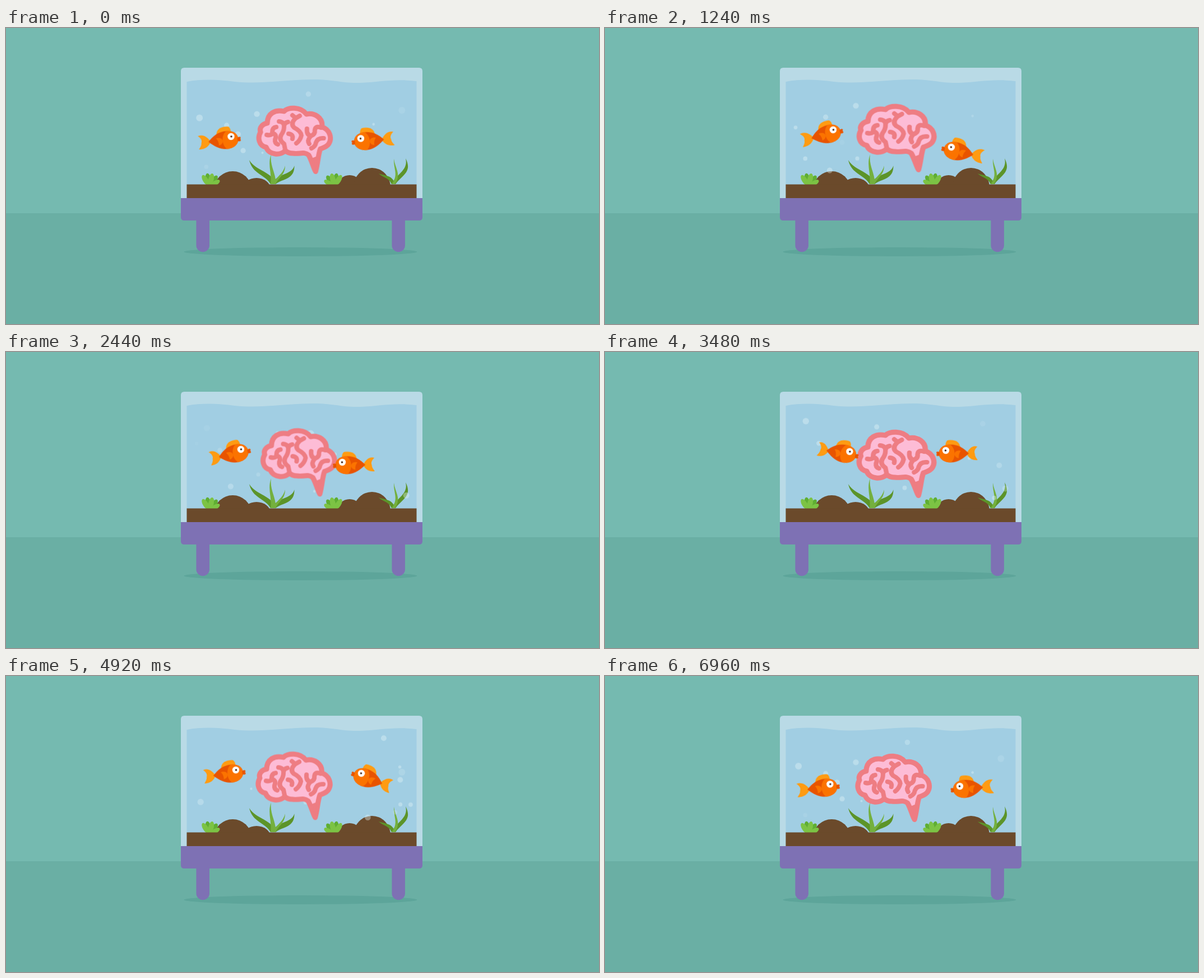
An HTML page that plays this animation: 1058x529 px, repeating every 7 s.

```html
<!DOCTYPE html>
<html lang="en">
<head>
<meta charset="utf-8">
<title>Brain in a fish tank</title>
<style>
  html, body { margin: 0; width: 100%; height: 100%; overflow: hidden; background: #75bab0; }
  svg { display: block; width: 100%; height: 100%; }

  #leftFish { animation: swimLeft 7s linear infinite; }
  #rightFish { animation: swimRight 7s linear infinite; }
  @keyframes swimLeft {
    0%, 100% { transform: translate(401.5px, 194px) rotate(-5deg); }
    17.7% { transform: translate(407px, 182px) rotate(-13deg); }
    34.9% { transform: translate(419px, 174px) rotate(-11deg); }
    49.7% { transform: translate(436.5px, 178px) rotate(11deg); }
    70.3% { transform: translate(410px, 168px) rotate(-6deg); }
    82.3% { transform: translate(399px, 174px) rotate(-8deg); }
  }
  @keyframes swimRight {
    0%, 100% { transform: translate(633px, 197.5px) rotate(-6deg); }
    17.7% { transform: translate(618px, 213px) rotate(11deg); }
    34.9% { transform: translate(600px, 197px) rotate(-2deg); }
    49.7% { transform: translate(608px, 176px) rotate(-1deg); }
    70.3% { transform: translate(634px, 174px) rotate(18deg); }
    82.3% { transform: translate(634.5px, 183px) rotate(8deg); }
  }

  /* Sine-like swings whose periods divide the loop */
  .sway, .bob, .stretch, .tail {
    animation: sway 3.5s cubic-bezier(.37, 0, .63, 1) -1.167s infinite alternate;
  }
  .bob { animation-name: bob; animation-duration: 1.75s; animation-delay: 0s; }
  .stretch { animation-name: stretch; animation-duration: 1.16667s; animation-delay: 0s; transform-origin: 515px 0; }
  .tail { animation-name: wag; animation-duration: .25s; animation-delay: -.125s; transform-origin: -38px 6px; }
  @keyframes sway { from { transform: translateX(-2.5px); } to { transform: translateX(7.5px); } }
  @keyframes bob { from { transform: translateY(0); } to { transform: translateY(-4px); } }
  @keyframes stretch { from { transform: scaleX(.997); } to { transform: scaleX(1.043); } }
  @keyframes wag { from { transform: scaleX(.92); } to { transform: scaleX(1.08); } }

  #bubbles circle { fill: #e6f6fa; opacity: 0; animation: rise 7s linear infinite; }
  @keyframes rise {
    0% { transform: translateY(15px); opacity: 0; }
    8%, 28% { opacity: .38; }
    36%, 100% { transform: translateY(-15px); opacity: 0; }
  }
</style>
</head>
<body>
<svg viewBox="0 0 1058 529" preserveAspectRatio="xMidYMid slice">
  <defs>
    <!-- The fish looks right, with its eye at the origin -->
    <g id="fish">
      <path class="tail" fill="#ff9b12" d="M-37 6C-42-4-50-9-58-6C-53-1-51 2-53 7C-53 12-56 15-58 18C-50 19-41 16-37 6Z"/>
      <path fill="#ff9b12" d="M-26-3C-26-16-16-20-3-18Q1-14 0-8Z"/>
      <path fill="#e85400" d="M-41 6C-32-4-22-10.500-8-10.500C6-10.500 12.500-3 12.500 5.500C12.500 14 4 21.500-9 21.500C-22 21.500-32 14-41 6Z"/>
      <path fill="#fb7300" d="M-8-10.500C6-10.500 12.500-3 12.500 5.500C12.500 14 4 21.500-9 21.500C-18 14-18-3-8-10.500Z"/>
      <path fill="#fb7300" d="M-27 1Q-17-1-15 7Q-17 14-23 14Q-22 7-27 1Z"/>
      <path fill="#e85400" d="M11 3Q17 0 17 4L16 5.700L17 7.500Q17 11 11 9Z"/>
      <circle r="6.200" fill="#fff"/>
      <circle cx=".5" r="1.800" fill="#4a2c20"/>
    </g>
    <ellipse id="leaf" cy="-13" rx="4.800" ry="10.500"/>
    <g id="bush">
      <g fill="#5fae33">
        <use href="#leaf" transform="rotate(-10)"/>
        <use href="#leaf" transform="rotate(36)"/>
      </g>
      <g fill="#7cc344">
        <use href="#leaf" transform="rotate(-32)"/>
        <use href="#leaf" transform="rotate(13)"/>
        <use href="#leaf" transform="rotate(60) scale(.9)"/>
      </g>
    </g>
  </defs>

  <rect width="1058" height="529" fill="#75bab0"/>
  <rect y="331" width="1058" height="198" fill="#6aafa4"/>
  <ellipse cx="525.500" cy="400" rx="208" ry="8" fill="#5da59a"/>
  <path stroke="#7e71b4" stroke-width="23.500" stroke-linecap="round" d="M351.200 335V388.500M700.200 335V388.500"/>
  <path fill="#b9dae6" d="M312 310V77Q312 71 318 71H737Q743 71 743 77V310Z"/>
  <path fill="#a1cee3" d="M322.500 304V96C350 91 378 92 408 96C458 101 500 92 549 92C585 92 600 99 632 98C665 97 690 90 732.500 95V304Z"/>

  <g fill="#6b4a2b">
    <ellipse cx="404.500" cy="288" rx="33" ry="32"/>
    <ellipse cx="447" cy="288" rx="25" ry="20"/>
    <ellipse cx="613" cy="284" rx="22" ry="21"/>
    <ellipse cx="653" cy="284" rx="33" ry="34"/>
  </g>
  <g fill="#5c9429">
    <path d="M434 236C440 262 463 262 472 279H481C475 256 446 256 434 236Z"/>
    <path d="M514.500 246C509 264 485 258 474 279H481C492 269 515 272 514.500 246Z"/>
    <path d="M665 260C671 267 683 267 688 279H694C690 262 674 264 665 260Z"/>
    <path d="M713 233C718 255 697 260 688 279H695C705 264 726 258 713 233Z"/>
  </g>
  <g fill="#74b03e">
    <path d="M473 226C466 244 475 262 472 279H481C483 262 470 246 473 226Z"/>
    <path d="M498 246C494 262 483 264 476 279H481C487 266 498 263 498 246Z"/>
    <path d="M692 234C691 252 701 262 688 279H694C706 262 694 250 692 234Z"/>
  </g>
  <use href="#bush" transform="translate(363 283)"/>
  <use href="#bush" transform="translate(586 283) scale(-1 1)"/>
  <path fill="#6b4a2b" d="M322.500 279.500H732.500V304H322.500Z"/>
  <path fill="#7e71b4" d="M312 304H743V338Q743 344 737 344H318Q312 344 312 338Z"/>

  <g id="bubbles"></g>

  <g class="sway"><g class="bob">
    <g class="stretch" stroke="#ee7d83" stroke-linecap="round" stroke-linejoin="round" fill="none">
      <path fill="#fdbcd6" stroke-width="9" d="M466 170C466 153 480 145 496 149C502 141 526 140 536 154C550 151 566 160 564 177C577 181 583 196 576 207C572 213 566 214 561 216C557 226 557 240 552.500 256.500C549 252 547 240 540 227C531 220 524 226 512 224C506 224 501 222 498 219C491 228 469 228 464 213C451 211 448 196 454 186C451 178 458 171 466 170Z"/>
      <path fill="#ee7d83" stroke-width="3" d="M547 234L557 230L554 256H551Z"/>
      <g stroke-width="8">
        <path d="M465 191Q475 193 475 186Q475 178 482 177"/>
        <path d="M475 188Q484 190 480 199Q479 206 485 208"/>
        <path d="M487 167Q497 168 496 177Q496 184 491 191Q486 200 496 207L498 217M496 175Q497 169 503 168"/>
        <path d="M511 156L517 161L524 157M516 162Q507 171 514 178Q526 184 527 192Q525 201 518 206M504 189Q513 190 511 198"/>
        <path d="M537 180Q536 191 544 193Q552 190 551 183Q552 174 562 178M543 194Q537 201 541 207"/>
        <path d="M567 197Q556 196 553 205Q552 212 545 215"/>
      </g>
    </g>
  </g></g>

  <g id="leftFish"><use href="#fish"/></g>
  <g id="rightFish"><use href="#fish" transform="scale(-1 1)"/></g>
</svg>
<script>
const COUNT = 36;
const LOOP = 7;
let seed = 11;

// Seeded random number between two limits
function random(min, max) {
  seed = seed * 16807 % 2147483647;
  return min + (max - min) * seed / 2147483647;
}

const layer = document.getElementById('bubbles');
for (let i = 0; i < COUNT; i++) {
  const bubble = document.createElementNS('http://www.w3.org/2000/svg', 'circle');
  bubble.setAttribute('cx', random(340, 722));
  bubble.setAttribute('cy', random(115, 255));
  bubble.setAttribute('r', random(2, 6.5));
  bubble.style.animationDelay = `${-LOOP * i / COUNT}s`;
  layer.append(bubble);
}
</script>
</body>
</html>
```
